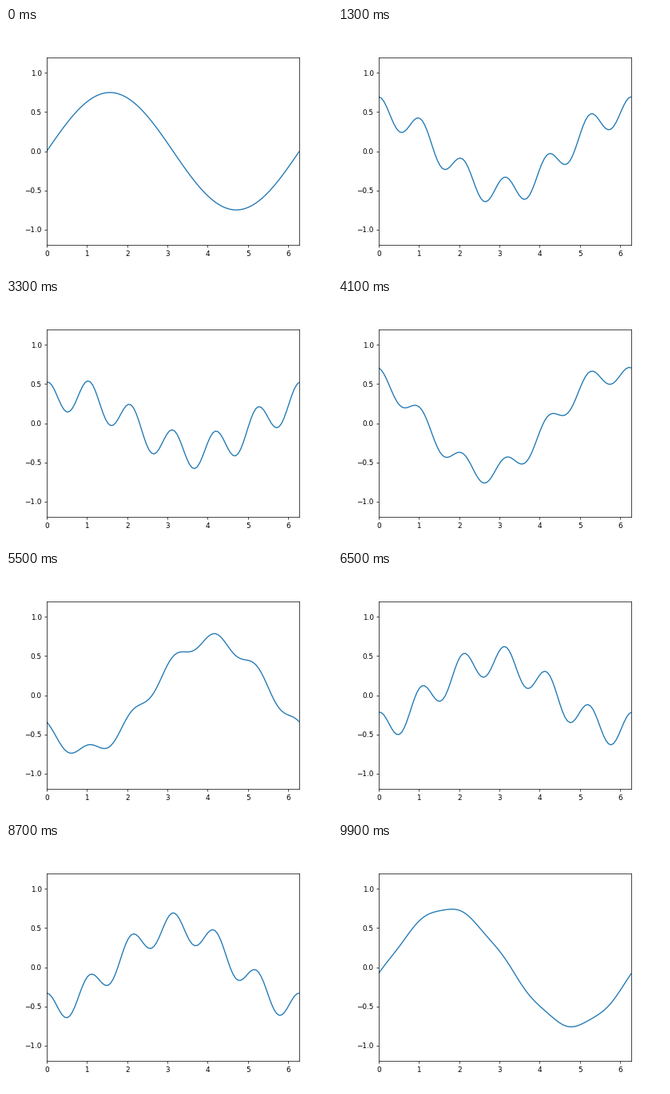
Write a matplotlib script that moves like this. It is 408 px wide and 306 px high and loops after 10 s.

```python
import numpy as np
import matplotlib.pyplot as plt
from matplotlib.animation import FuncAnimation

FRAMES = 100
INTERVAL = 100  # ms

x = np.linspace(0, 2 * np.pi, 100)


def wave(frame):
    """Travelling slow wave that trades amplitude with a standing ripple."""
    theta = 2 * np.pi * frame / FRAMES
    slow = 0.75 * np.cos(theta) * np.sin(x + 2 * theta)
    ripple = 0.25 * abs(np.sin(theta)) * np.cos(6 * x)
    return slow + ripple


fig, ax = plt.subplots(figsize=(6.4, 4.8), dpi=63.75)
ax.set_xlim(0, 2 * np.pi)
ax.set_ylim(-1.2, 1.2)
line, = ax.plot(x, wave(0), color="tab:blue", lw=1.5)


def update(frame):
    line.set_ydata(wave(frame))
    return line,


anim = FuncAnimation(fig, update, frames=FRAMES, interval=INTERVAL,
                     repeat=True, repeat_delay=0)
plt.show()
```
